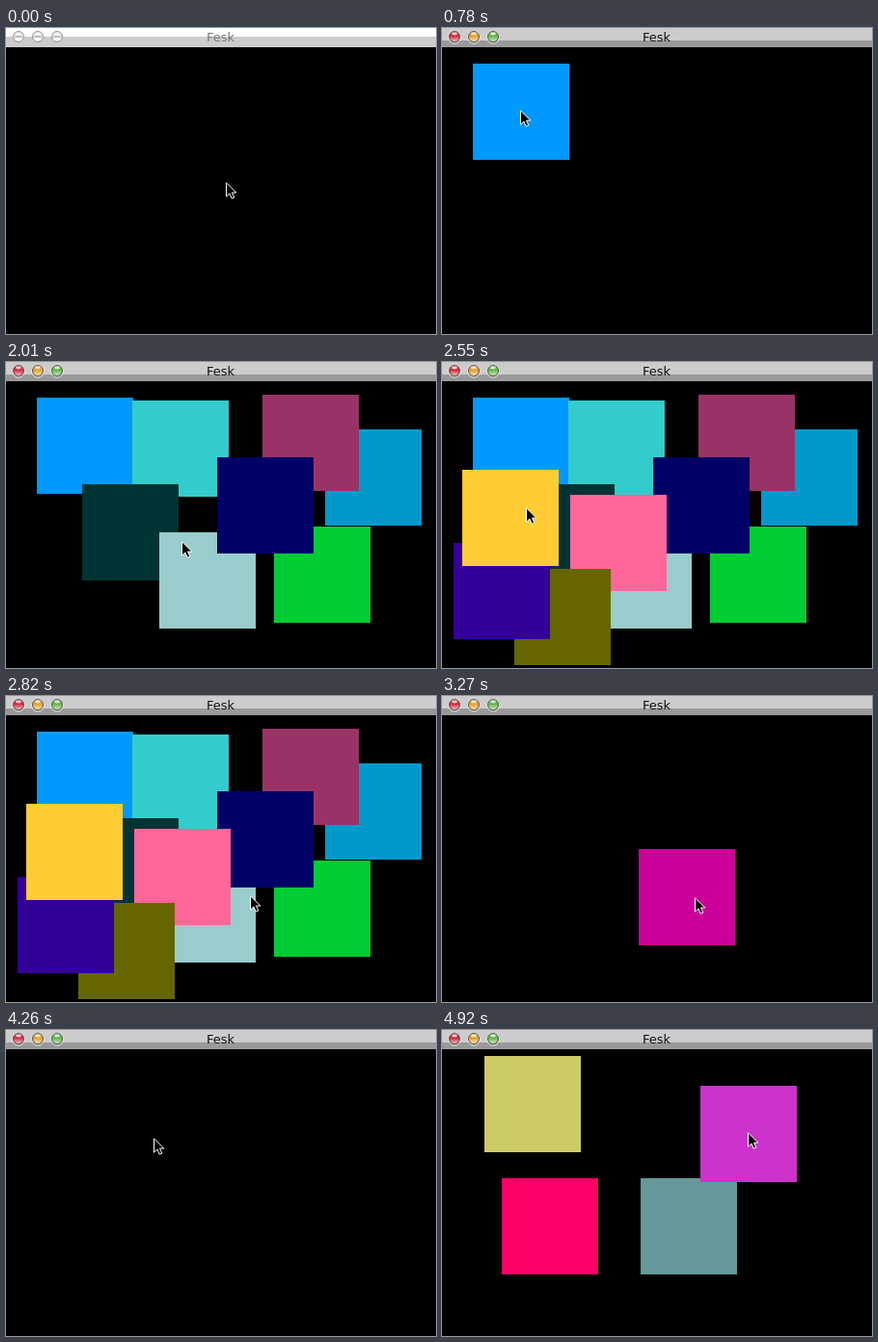
These frames come from a looping animation (446 px wide and 318 px high, 5100 ms). An HTML page:

```html
<!DOCTYPE html>
<html lang="en">
<head>
<meta charset="utf-8">
<title>Fesk</title>
<style>
  html, body { margin: 0; width: 100%; height: 100%; overflow: hidden; background: #000; }
  svg { display: block; width: 446px; height: 318px; }
  .title { font: 13px "DejaVu Sans", sans-serif; text-anchor: middle; }

  /* the window gains focus shortly after the loop starts */
  .idle, .active { animation: 5100ms step-end infinite; }
  .idle { animation-name: idle; }
  .active { animation-name: active; }
  @keyframes idle { 0% { visibility: visible } 1.7647% { visibility: hidden } }
  @keyframes active { 0% { visibility: hidden } 1.7647% { visibility: visible } }
</style>
</head>
<body>
<svg viewBox="0 0 446 318">
  <defs>
    <linearGradient id="shine" x2="0" y2="1">
      <stop offset="0" stop-color="#fff" stop-opacity=".1"/>
      <stop offset=".45" stop-color="#fff" stop-opacity="0"/>
      <stop offset="1" stop-color="#fff" stop-opacity=".75"/>
    </linearGradient>
    <g id="gloss">
      <circle cy=".8" r="6.4" fill="none" stroke="#eee" stroke-width=".8"/>
      <circle r="5.5" fill="url(#shine)" stroke="#333" stroke-opacity=".75"/>
      <ellipse cy="-3" rx="2.8" ry="1.4" fill="#fff" fill-opacity=".75"/>
    </g>
    <g id="dull">
      <circle r="5.5" fill="#e4e4e4" stroke="#999"/>
      <path d="M-3.5 0h7" stroke="#999"/>
      <path d="M-3 -2.5h6M-3.5 2.5h7" stroke="#fff" stroke-width="2"/>
    </g>
  </defs>

  <rect width="446" height="318"/>
  <g id="squares" shape-rendering="crispEdges"></g>

  <g class="idle">
    <rect width="446" height="20" fill="#ccc"/>
    <rect width="446" height="9" fill="#fff"/>
    <use href="#dull" x="13" y="9"/>
    <use href="#dull" x="33" y="9"/>
    <use href="#dull" x="53" y="9"/>
    <text class="title" x="222.5" y="14" fill="#777">Fesk</text>
  </g>
  <g class="active">
    <rect width="446" height="20" fill="#999"/>
    <rect width="446" height="13" fill="#ccc"/>
    <circle cx="13" cy="9" r="5.5" fill="#d32f3f"/>
    <circle cx="33" cy="9" r="5.5" fill="#e8a030"/>
    <circle cx="53" cy="9" r="5.5" fill="#62b848"/>
    <use href="#gloss" x="13" y="9"/>
    <use href="#gloss" x="33" y="9"/>
    <use href="#gloss" x="53" y="9"/>
    <text class="title" x="222.5" y="14" fill="#111">Fesk</text>
  </g>

  <path id="cursor" d="M.5 .8V15.2L3.9 12 6.2 17.2 8.8 16.1 6.5 11.1H10.8Z" fill="#000" stroke="#fff"/>
</svg>

<script>
const LOOP = 5100, STEP = 30, SIZE = 100;
const clears = [3000, 4260, LOOP];

// time, x, y of the pointer; a colour marks a click that drops a square
const path = [
  [0, 229, 162], [360, 229, 162],
  [780, 82, 87, '#09f'], [960, 181, 90, '#3cc'],
  [1110, 129, 177, '#033'], [1260, 209, 227, '#9cc'],
  [1380, 324, 221], [1440, 328, 221, '#0c3'],
  [1590, 381, 120, '#09c'], [1710, 316, 84, '#936'],
  [1860, 269, 149, '#006'], [2010, 183, 188],
  [2040, 183, 188, '#f69'], [2190, 125, 265, '#660'],
  [2340, 62, 238, '#309'], [2520, 71, 162, '#fc3'],
  [2550, 88, 153], [2820, 254, 209], [3240, 254, 209, '#c09'],
  [3390, 353, 217, '#396'], [3540, 318, 108, '#c63'],
  [3690, 208, 92, '#69c'], [3870, 82, 120, '#963'],
  [4020, 130, 217, '#93c'], [4260, 154, 114], [4440, 154, 114],
  [4560, 94, 77, '#cc6'], [4680, 112, 204, '#f06'],
  [4800, 256, 204, '#699'], [4920, 318, 108, '#c3c'], [LOOP, 318, 108]
];

const layer = document.getElementById('squares');
const cursor = document.getElementById('cursor');

const squares = path.filter(p => p[3]).map(([on, x, y, fill]) => {
  const el = document.createElementNS('http://www.w3.org/2000/svg', 'rect');
  const attrs = { x: x - SIZE / 2, y: y - SIZE / 2, width: SIZE, height: SIZE, fill };
  for (const name in attrs) el.setAttribute(name, attrs[name]);
  layer.append(el);
  return { el, on, off: clears.find(c => c > on) };
});

const samePlace = (a, b) => a[1] === b[1] && a[2] === b[2];

// speed at a waypoint; zero where the pointer rests
function slope(i, axis) {
  const a = path[i - 1], b = path[i], c = path[i + 1];
  if (!a || !c || samePlace(a, b) || samePlace(b, c)) return 0;
  return (c[axis] - a[axis]) / (c[0] - a[0]);
}

function pointer(t, axis) {
  let i = 0;
  while (i < path.length - 2 && path[i + 1][0] <= t) i++;
  const a = path[i], b = path[i + 1], d = b[0] - a[0];
  const u = (t - a[0]) / d, v = 1 - u;
  return v * v * (1 + 2 * u) * a[axis] + u * u * (3 - 2 * u) * b[axis]
    + d * u * v * (v * slope(i, axis) - u * slope(i + 1, axis));
}

function draw(now) {
  const t = Math.floor(now % LOOP / STEP) * STEP;
  for (const s of squares) {
    s.el.setAttribute('visibility', t >= s.on && t < s.off ? 'visible' : 'hidden');
  }
  const x = Math.round(pointer(t, 1)) - 1, y = Math.round(pointer(t, 2)) - 2;
  cursor.setAttribute('transform', `translate(${x} ${y})`);
}

function tick() {
  draw(performance.now() - start);
  requestAnimationFrame(tick);
}

const start = performance.now();
tick();
</script>
</body>
</html>
```
